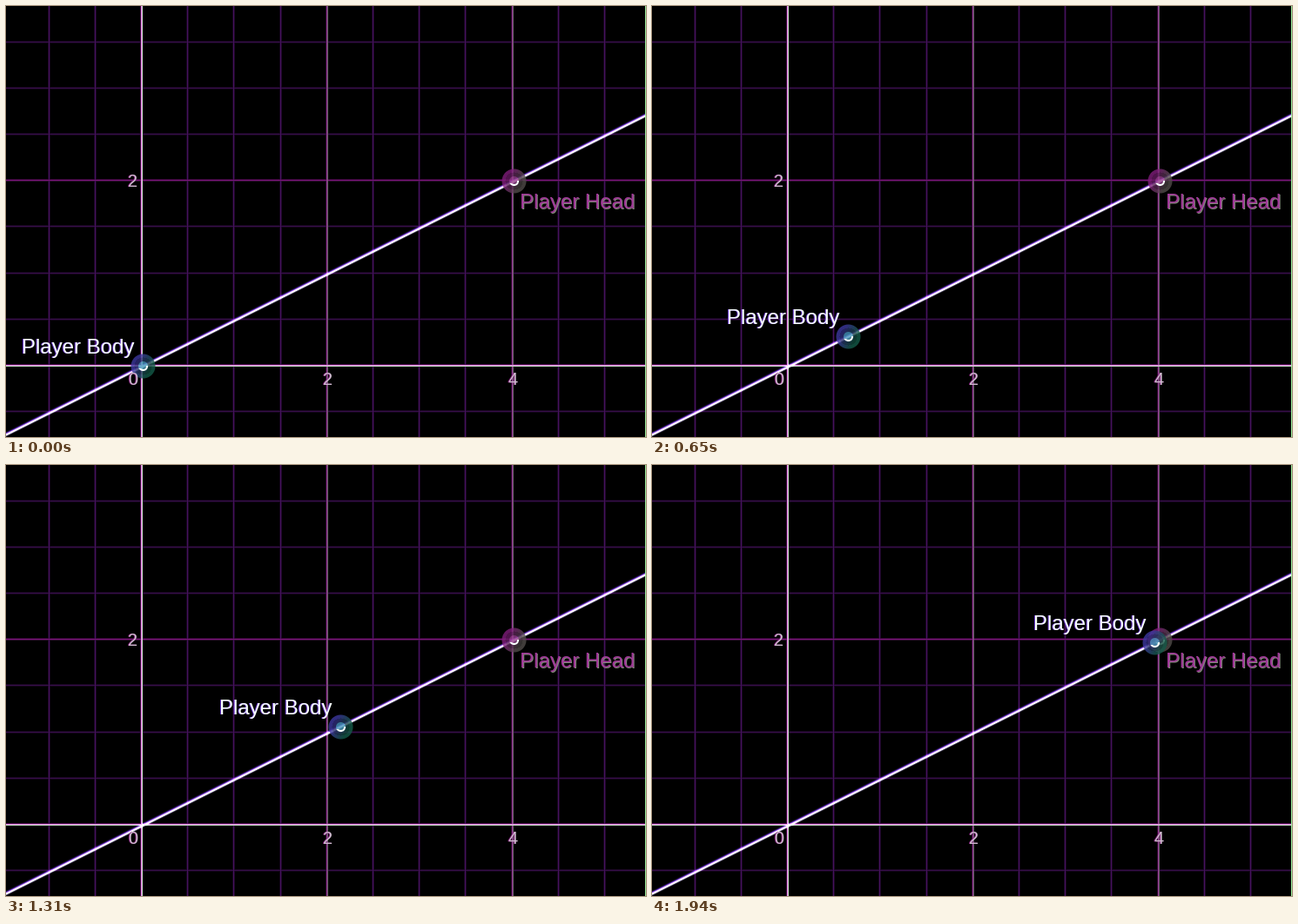
A matplotlib script that plays this animation: 735 by 496 pixels, repeating every 2140 ms.

```python
import numpy as np
import matplotlib.pyplot as plt
from matplotlib.animation import FuncAnimation

W, H, DPI = 735, 496, 64
OX, OY, UNIT = 157, 414, 106.4   # origin and pixels per unit
STEP_MS, HOLD_MS, LOOP_MS, TICK_MS = 30, 200, 2140, 10
LAST = 59

BLACK = np.zeros(3)
MAGENTA = np.array([0.95, 0.12, 0.95])
VIOLET = np.array([0.50, 0.26, 1.00])
MINT = np.array([0.62, 0.95, 0.62])
WHITE = np.array([0.97, 1.00, 0.99])
TEAL = np.array([0.08, 0.36, 0.29])
BLUE = np.array([0.24, 0.22, 0.62])
CYAN = np.array([0.30, 0.68, 0.82])
PLUM = np.array([0.50, 0.12, 0.48])
GREY = np.array([0.32, 0.30, 0.29])
PINK = np.array([0.64, 0.26, 0.60])

fig = plt.figure(figsize=(W / DPI, H / DPI), dpi=DPI, facecolor="black")
ax = fig.add_axes([0, 0, 1, 1])
ax.axis("off")


def fringe(d, tint, light):
    """Line profile over distance d: a tinted edge before a lighter core."""
    d = np.asarray(d)[..., None]
    return tint * np.exp(-(d + 1) ** 2) + light * np.exp(-((d + 0.3) / 0.8) ** 2)


def rule(d, i, dim, light):
    """Grid line i, in half units: axis at 0, major every 4th, else minor."""
    if i == 0:
        return fringe(d, MAGENTA * 0.65, MINT)
    if i % 4 == 0:
        return fringe(d, MAGENTA * 0.5, MINT * light)
    return fringe(d, (MAGENTA + VIOLET) * dim, BLACK)


def backdrop():
    x, y = np.arange(W), np.arange(H)
    cols = sum(rule(x - round(OX - 1 + i * UNIT / 2), i, 0.19, 0.4)
               for i in range(-2, 11))
    rows = sum(rule(y - round(OY - i * UNIT / 2), i, 0.15, 0.05)
               for i in range(-1, 8))
    img = np.maximum(cols[None], rows[:, None])
    slope = y[:, None] - (OY - (x[None] - OX) / 2)
    img = img + fringe((slope - 1) / 1.6, VIOLET, WHITE)
    img[:, -1] = MINT
    return np.clip(img, 0, 1)


def blend(a, b, t):
    return a + (b - a) * t[..., None]


def disc(left, right, core):
    """Translucent disc lit from two sides, with a core and a bright lip."""
    y, x = np.mgrid[-16:17, -16:17]
    r = np.hypot(x, y)
    color = blend(left, right, np.clip(0.5 + x / 18 + y / 36, 0, 1))
    color = color * np.where(r > 10, 1, 0.8)[..., None]
    inner = np.clip(6 - r, 0, 1) * 0.8
    lip = np.clip(1.6 - abs(r - 4.5), 0, 1) * (y + x / 3 > 1.2)
    color = blend(blend(color, core, inner), WHITE, lip)
    alpha = np.maximum(np.clip(14.5 - r, 0, 1) * 0.8, lip)
    return np.dstack([color, alpha])


def box(x, y):
    return (x - 16.5, x + 16.5, y + 16.5, y - 16.5)


def show(img, extent):
    return ax.imshow(img, extent=extent, interpolation="nearest", aspect="auto")


def label(x, y, s, px, under, over, shift, **kw):
    """Text drawn twice for a coloured fringe."""
    return [ax.text(x + dx, y + dy, s, color=c, family="Liberation Sans",
                    fontsize=px * 72 / DPI, va="baseline", **kw)
            for c, (dx, dy) in ((under, shift), (over, (0, 0)))]


show(backdrop(), (-0.5, W - 0.5, H - 0.5, -0.5))
show(disc(PLUM, GREY, PINK), box(OX + 4 * UNIT, OY - 2 * UNIT))
body = show(disc(BLUE, TEAL, CYAN), box(OX, OY))
ax.set_xlim(-0.5, W - 0.5)
ax.set_ylim(H - 0.5, -0.5)

for v in (0, 2, 4):
    x = OX - 12 if v == 0 else OX + v * UNIT - 1
    label(x, OY + 21, v, 20, PLUM, "#d0bcd0", (-1, 0), ha="center")
label(OX - 12, OY - 2 * UNIT + 6, 2, 20, PLUM, "#d0bcd0", (-1, 0), ha="center")
label(590, 232, "Player Head", 24, "#808878", "#a03898", (1, 1))
name = label(0, 0, "Player Body", 24, VIOLET * 0.8, WHITE, (-1, 0))

# key points of the drag: step and distance travelled to the right
STEPS, DIST = np.array([(0, 0), (5, 10.5), (16, 68), (32, 184),
                        (43, 264), (51, 340), (LAST, 420)]).T
EASE = 1.4


def travel(k):
    """Accelerating path through the key points."""
    return np.interp(k, STEPS, DIST ** (1 / EASE)) ** EASE


def update(n):
    t = n * TICK_MS
    k = 0 if t < HOLD_MS else min((t - HOLD_MS) // STEP_MS + 1, LAST)
    dx = travel(k)
    x, y = round(OX + dx), round(OY - dx / 2)
    body.set_extent(box(x, y))
    for text, shift in zip(name, (-1, 0)):
        text.set_position((x - 139 + shift, y - 15))
    return [body, *name]


anim = FuncAnimation(fig, update, frames=LOOP_MS // TICK_MS, interval=TICK_MS,
                     repeat=True, repeat_delay=0, blit=False)
plt.show()
```
